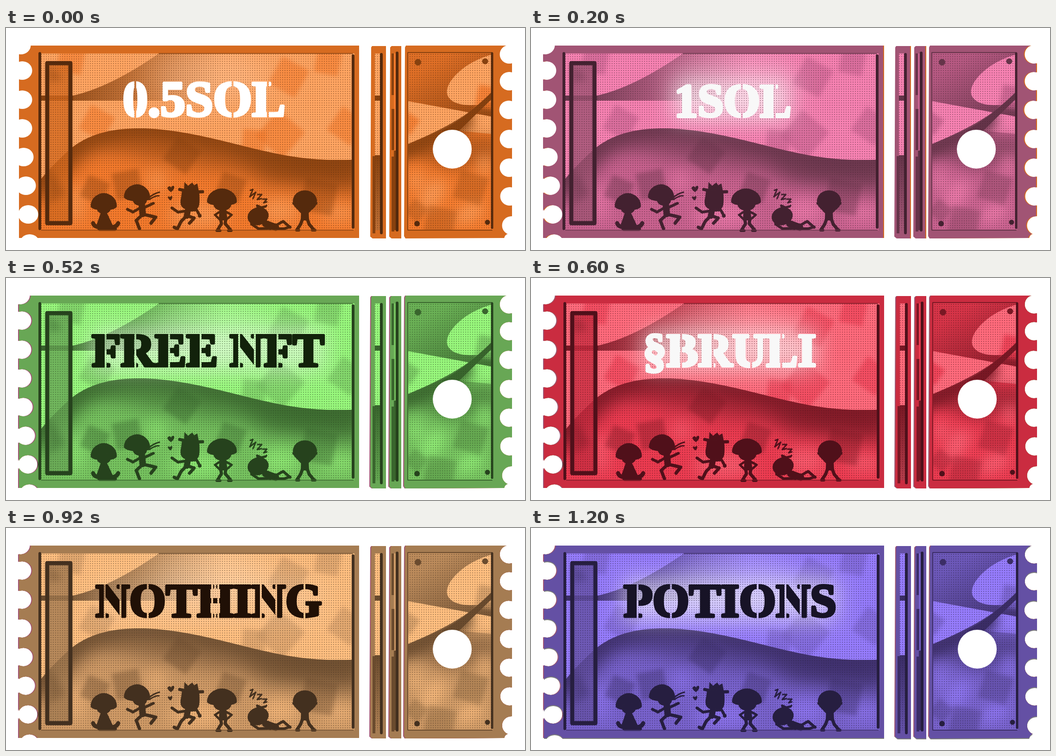
Animation, 1120 px wide and 480 px high, one loop 1.4 s. Source, as an HTML page with a canvas:

```html
<!DOCTYPE html>
<html lang="en">
<head>
<meta charset="utf-8">
<title>Prize tickets</title>
<style>
  html, body { margin: 0; width: 100%; height: 100%; overflow: hidden; background: #fff; }
  canvas { display: block; }
</style>
</head>
<body>
<canvas id="stage" width="1120" height="480"></canvas>
<script>
const W = 1120, H = 480, HOLD = 200;

const tickets = [
  { text: '0.5SOL', x: 427.5, base: 190, size: 108, fill: '#fff', glow: 0,
    edge: '#d66b20', light: '#ffa562', mid: '#f47a2c', shade: '#87410f', ink: '#552a0d' },
  { text: '1SOL', x: 435.5, base: 192, size: 101, fill: '#f8f8f8', glow: .65, dx: -2,
    edge: '#a15474', light: '#f782b2', mid: '#c9628f', shade: '#653449', ink: '#432130' },
  { text: 'FREE NFT', x: 436, base: 191, size: 102, fill: '#12220b', glow: .5,
    edge: '#68a755', light: '#98f77c', mid: '#76c25f', shade: '#39652d', ink: '#26421d' },
  { text: '§BRULI', x: 428.5, base: 191, size: 102, fill: '#f8f8f8', glow: .6,
    edge: '#ca2c40', light: '#ff6b7c', mid: '#ec3b50', shade: '#791824', ink: '#50101a' },
  { text: 'NOTHING', x: 437.5, base: 192, size: 101, fill: '#201006', glow: .12,
    edge: '#a57c52', light: '#ffbf80', mid: '#cf9a66', shade: '#6a4b2e', ink: '#43301f' },
  { text: 'PORTAL NFT', x: 435.5, base: 194, size: 81, fill: '#1c1c1c', glow: .4, dy: 2,
    edge: '#7c7c7c', light: '#c8c8c8', mid: '#979797', shade: '#4c4c4c', ink: '#303030' },
  { text: 'POTIONS', x: 429.5, base: 192, size: 102, fill: '#171326', glow: .6,
    edge: '#6450a4', light: '#967cfc', mid: '#7862cc', shade: '#3b2d66', ink: '#261e40' }
];

// Where each letter is cut, as a share of its advance
const slits = { 0: [.5], O: [.5], G: [.52], U: [.55], E: [.45], F: [.47], P: [.49],
  R: [.43], B: [.46], L: [.47], H: [.42, .58], N: [.27, .73] };

function newCanvas(w = W, h = H) {
  return Object.assign(document.createElement('canvas'), { width: w, height: h });
}

function shape(g, d, color) {
  g.fillStyle = color;
  g.fill(new Path2D(d));
}

function line(g, d, color, width) {
  g.strokeStyle = color;
  g.lineWidth = width;
  g.stroke(new Path2D(d));
}

function oval(g, x, y, rx, ry = rx, turn = 0) {
  g.beginPath();
  g.ellipse(x, y, rx, ry, turn, 0, 7);
  g.fill();
}

function rect(g, x0, y0, x1, y1, color) {
  g.fillStyle = color;
  g.fillRect(x0, y0, x1 - x0, y1 - y0);
}

function soft(g, blur, alpha, draw) {
  g.save();
  g.filter = `blur(${blur}px)`;
  g.globalAlpha = alpha;
  draw();
  g.restore();
}

function clipped(g, d, draw) {
  g.save();
  g.clip(new Path2D(d));
  draw();
  g.restore();
}

function fade(g, x0, y0, x1, y1, color, from, to = '00') {
  const grad = g.createLinearGradient(x0, y0, x1, y1);
  grad.addColorStop(0, color + from);
  grad.addColorStop(1, color + to);
  return grad;
}

function patches(g, color, alpha, list) {
  soft(g, 4, alpha, () => {
    g.fillStyle = color;
    for (const [x, y, size, turn] of list) {
      g.save();
      g.translate(x, y);
      g.rotate(turn);
      g.fillRect(-size / 2, -size / 2, size, size);
      g.restore();
    }
  });
}

function halftone(g, x0, y0, x1, y1, color) {
  const tile = newCanvas(5, 5), t = tile.getContext('2d');
  t.fillStyle = color;
  t.fillRect(1, 1, 2, 2);
  g.save();
  g.globalAlpha = .42;
  rect(g, x0, y0, x1, y1, g.createPattern(tile, 'repeat'));
  g.restore();
}

function body(g, color) {
  shape(g, 'M28 38H762V454H28Z M790 39H820V455H791L786 451L788 42Z ' +
    'M832 39H853V455H832L827 451L829 42Z M863 38H1080L1092 46V442L1076 454L862 455L859 450L861 42Z', color);
  g.globalCompositeOperation = 'destination-out';
  for (const [x, y] of [[32, 37], [35, 92], [35, 155], [35, 217], [38, 279], [43, 341], [48, 403], [51, 466]])
    oval(g, x, y, 21.5, 20);
  for (const [x, y] of [[1086, 57], [1086, 115], [1085, 177], [1086, 240], [1086, 302], [1087, 364], [1091, 427]])
    oval(g, x, y, 20.5, 20);
  oval(g, 1088, 456, 13, 12);
  g.globalCompositeOperation = 'source-atop';
}

function landscape(g, c) {
  rect(g, 74, 55, 752, 438, c.light);
  patches(g, c.mid, .6, [[140, 70, 54, .2], [196, 205, 58, .5], [695, 74, 52, .2], [610, 106, 66, .5],
    [592, 230, 76, .7], [535, 245, 50, .1], [735, 212, 62, .6]]);

  shape(g, 'M74 157V151Q120 153 145 146Q225 128 330 55H520V157Z', fade(g, 150, 110, 460, 150, c.shade, 'd0'));
  shape(g, 'M74 146H145V157H74Z', c.shade);

  const crest = 'M60 345Q100 295 143 258C190 222 245 216 300 217C430 222 545 274 660 283Q700 287 770 284';
  const hill = crest + 'V450H60Z';
  shape(g, hill, c.mid);
  clipped(g, hill, () => {
    soft(g, 18, .9, () => line(g, crest, c.shade, 64));
    soft(g, 22, .75, () => shape(g, 'M500 270L770 285V358L560 335Z', c.shade));
    soft(g, 20, .5, () => shape(g, 'M190 255Q320 220 490 270L570 320L330 290Z', c.shade));
    soft(g, 16, .65, () => {
      g.fillStyle = c.light;
      for (const [x, y, rx, ry] of [[150, 380, 18, 42], [415, 405, 65, 28], [590, 395, 45, 28], [325, 330, 18, 25], [720, 400, 40, 18]])
        oval(g, x, y, rx, ry);
    });
    patches(g, c.shade, .38, [[262, 338, 58, -.2], [192, 350, 50, .4], [380, 275, 60, .6], [485, 345, 54, .35], [675, 365, 70, .2]]);
  });
}

function stub(g, c) {
  clipped(g, 'M867 53H1051V437H867Z', () => {
    rect(g, 867, 53, 1051, 438, c.light);
    shape(g, 'M867 53H1051V192L867 158Z', c.mid);
    shape(g, 'M867 53H1051V192L867 158Z', fade(g, 930, 70, 1010, 200, c.shade, '30', 'd0'));
    shape(g, 'M1055 56C990 70 942 120 953 146C963 168 1000 172 1055 160Z', c.light);
    patches(g, c.mid, .8, [[1040, 150, 48, .2], [866, 205, 40, .6]]);

    const slope = 'M860 254C950 216 1000 190 1056 130V450H860Z';
    clipped(g, slope, () => {
      shape(g, 'M860 254C920 228 950 220 985 196L1056 130L976 222L1056 230V450H860Z', c.mid);
      soft(g, 12, .9, () => line(g, 'M850 266Q950 224 985 200', c.shade, 46));
      soft(g, 14, .5, () => shape(g, 'M867 270L950 230L1060 235V285L960 310Z', c.shade));
      shape(g, 'M940 222Q1000 190 1052 130V150L978 222Z', c.shade);
      soft(g, 14, .75, () => {
        g.fillStyle = c.light;
        oval(g, 1032, 295, 14, 24);
        oval(g, 920, 360, 22, 38, .6);
        oval(g, 1000, 400, 35, 18, -.5);
        oval(g, 885, 330, 14, 20);
      });
      patches(g, c.shade, .28, [[1003, 345, 62, .3], [937, 420, 62, .2], [885, 395, 38, .7]]);
    });
  });
  halftone(g, 867, 53, 1051, 437, c.ink);
  line(g, 'M867 437V53H1049M867 437H1049', c.shade, 2);
  line(g, 'M1049 55V432', c.ink, 5);
  g.fillStyle = c.shade;
  oval(g, 889, 74, 7);
  oval(g, 1034, 72, 6.5);
  g.fillStyle = c.ink;
  oval(g, 887, 423, 6);
  oval(g, 1039, 420, 5.5);
  g.fillStyle = '#fff';
  oval(g, 963, 262, 42);
}

function strips(g, c) {
  rect(g, 796, 55, 808, 437, c.light);
  rect(g, 796, 146, 808, 157, c.shade);
  rect(g, 796, 275, 808, 437, fade(g, 0, 275, 0, 430, c.shade, 'ff', '90'));
  halftone(g, 796, 55, 808, 437, c.ink);
  rect(g, 791, 277, 797, 444, c.shade);
  line(g, 'M810 57V443', c.ink, 6);
  rect(g, 837, 55, 842, 437, c.mid);
  rect(g, 837, 265, 842, 437, c.shade);
  rect(g, 832, 55, 837, 145, c.shade);
  rect(g, 832, 175, 838, 264, c.shade);
  rect(g, 832, 278, 838, 440, c.shade);
  line(g, 'M844 54V437', c.ink, 6);
}

function cap(g, x, top, half, height, color, turn = 0) {
  g.save();
  g.translate(x, top);
  g.rotate(turn);
  shape(g, `M${-half} ${height - 6}C${-half - 2} ${height * .35} ${-half * .5} 0 0 0` +
    `S${half + 2} ${height * .35} ${half} ${height - 6}Q${half * .8} ${height + 1} 0 ${height + 1}T${-half} ${height - 6}Z`, color);
  g.restore();
}

function crowd(g, color) {
  const limb = (d, w = 6) => line(g, d, color, w);
  const blob = (...a) => { g.fillStyle = color; oval(g, ...a); };

  // sitting
  cap(g, 211, 357, 28, 36, color);
  blob(211, 390, 15, 12);
  shape(g, 'M205 398H217L232 430H194Z', color);
  limb('M188 422Q190 430 203 431M242 422Q240 430 225 431M202 434H235', 9);

  // sprinting with a headband
  cap(g, 284, 338, 28, 36, color, .05);
  blob(289, 373, 15, 11);
  limb('M306 369Q318 358 331 355M309 371Q324 361 330 363', 3);
  limb('M293 382L295 402', 14);
  limb('M291 388L274 398L262 392M299 388L318 379');
  limb('M297 403L323 409L313 422M294 404L281 416L288 434', 7);

  // running in a hat
  shape(g, 'M356 355Q344 346 351 343Q355 341 356 345Q361 338 363 343Q364 349 356 355Z M355 373Q347 367 350 364L354 365L358 363Q361 367 355 373Z', color);
  shape(g, 'M384 351L385 333L393 341L402 334L406 340L413 336L416 352Z', color);
  limb('M375 349Q398 356 424 354', 7);
  shape(g, 'M380 350L417 355Q420 390 411 391H385Q373 385 378 366Z', color);
  limb('M393 392L390 406', 13);
  limb('M394 395L371 398L358 389M397 394L411 393L418 405');
  limb('M392 406L406 411L396 422M389 407L378 418L370 434L363 431', 7);
  blob(418, 406, 4);

  // hands on hips
  cap(g, 466, 347, 32, 36, color);
  blob(467, 382, 19, 13);
  shape(g, 'M461 391H475L478 416H459Z', color);
  limb('M462 397L451 404L459 412M474 397L487 404L478 412', 5);
  limb('M463 413L465 423L457 436M474 413L473 423L484 436', 7);
  limb('M455 438H462M480 438H486');

  // asleep
  limb('M527 351L533 349L526 365L539 355L533 369M543 360L552 360L542 371L551 369M554 370L563 370L556 378L563 376', 3);
  blob(562, 384, 2);
  blob(544, 407, 23, 19, -.3);
  limb('M544 391L542 384L551 388L560 386', 5);
  limb('M530 424L545 434L566 433', 6);
  limb('M560 423L582 431', 15);
  limb('M570 434L598 418L613 431M578 434H600L613 430', 6);

  // hands behind the head
  blob(645, 374, 26, 23);
  limb('M621 379L637 397M669 379L652 397M622 379L632 373M668 379L658 373', 6);
  shape(g, 'M637 391H653L654 416H636Z', color);
  limb('M640 412L636 424L628 436M650 412L654 424L664 436', 7);
  limb('M627 437H632M661 437H667', 6);
}

function headline(c) {
  const sheet = newCanvas(), g = sheet.getContext('2d');
  g.font = `bold ${c.size}px "Liberation Serif", Tinos, serif`;
  g.fillStyle = g.strokeStyle = c.fill;
  g.lineWidth = 6;
  g.lineJoin = 'round';
  const left = c.x - g.measureText(c.text).width / 2;
  g.fillText(c.text, left, c.base);
  g.strokeText(c.text, left, c.base);
  [...c.text].forEach((ch, i) => {
    const start = left + g.measureText(c.text.slice(0, i)).width;
    for (const cut of slits[ch] || [])
      g.clearRect(start + cut * g.measureText(ch).width - 2, c.base - c.size, 4, c.size * 1.2);
  });
  return { sheet, width: g.measureText(c.text).width };
}

function paintTicket(c) {
  const layer = newCanvas(), g = layer.getContext('2d');
  const title = headline(c);
  g.lineCap = g.lineJoin = 'round';
  g.translate(c.dx || 0, c.dy || 0);
  body(g, c.edge);
  clipped(g, 'M74 55H752V438H74Z', () => {
    landscape(g, c);
    soft(g, 24, c.glow, () => rect(g, c.x - title.width / 2, 110, c.x + title.width / 2, 200, '#fff'));
    soft(g, 30, .16, () => { g.fillStyle = '#fff'; oval(g, 440, 105, 130, 60); });
    soft(g, 1, .8, () => rect(g, 89, 76, 139, 422, c.edge));
    soft(g, 8, .4, () => shape(g, 'M92 78L125 110L92 118Z M92 300L130 360L92 380Z', c.shade));
  });
  crowd(g, c.ink);
  halftone(g, 74, 55, 750, 437, c.ink);
  line(g, 'M89 76H139V422H89Z', c.ink, 9);
  line(g, 'M73 55V434M749 60V431', c.ink, 6);
  line(g, 'M330 55H748M76 437H750', c.shade, 1.5);
  strips(g, c);
  stub(g, c);
  g.setTransform(1, 0, 0, 1, 0, 0);
  g.drawImage(title.sheet, 0, 0);
  return layer;
}

const layers = tickets.map(paintTicket);
const stage = document.getElementById('stage').getContext('2d');

// Tickets pile up, so slightly shifted ones leave thin fringes
function draw() {
  const step = Math.floor(performance.now() / HOLD) % layers.length;
  rect(stage, 0, 0, W, H, '#fff');
  for (const layer of layers.slice(0, step + 1)) stage.drawImage(layer, 0, 0);
  requestAnimationFrame(draw);
}
draw();
</script>
</body>
</html>
```
